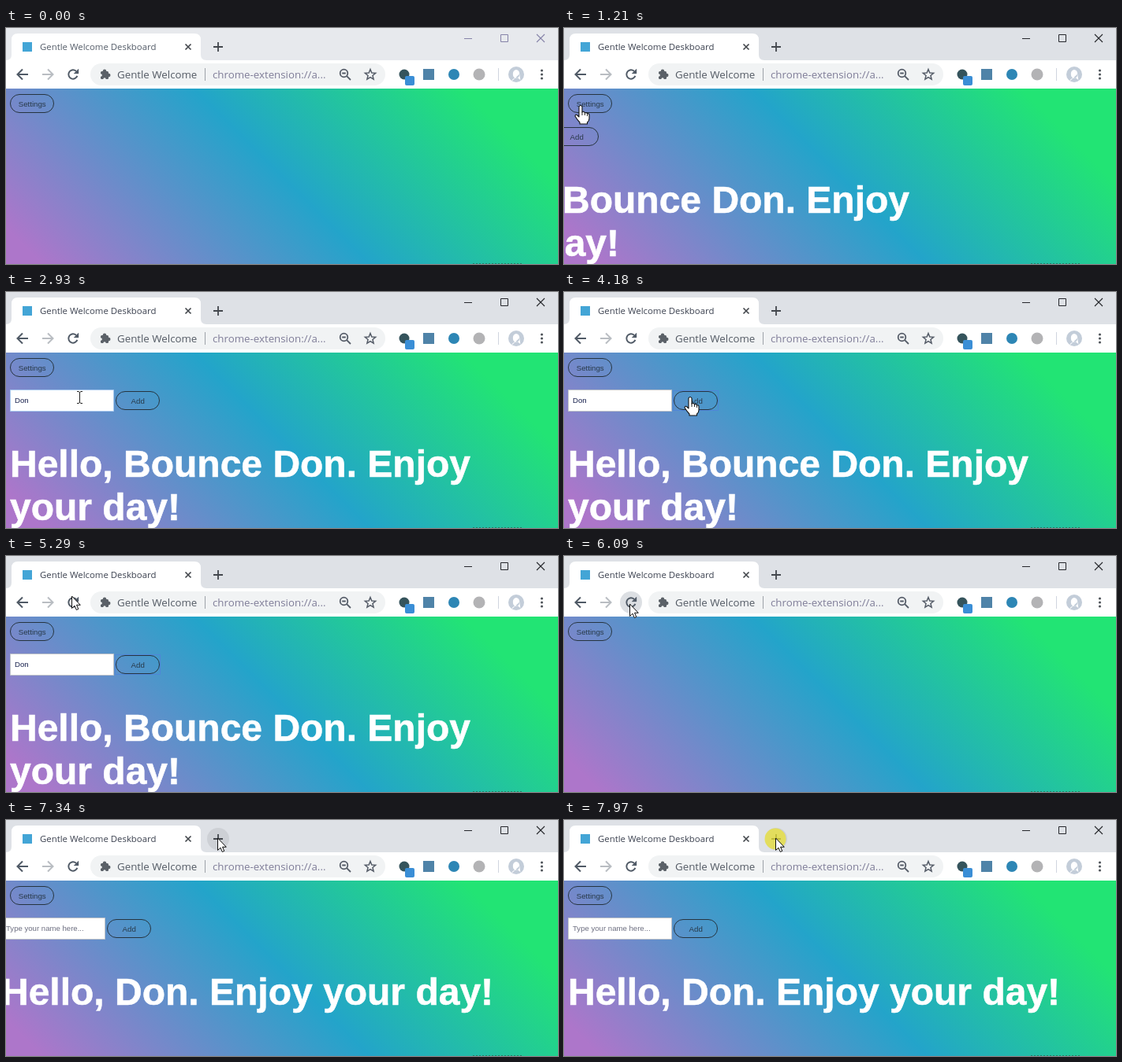
An HTML page with a canvas for the animation above (8 s loop, 700 by 300 pixels).

```html
<!DOCTYPE html>
<html lang="en">
<head>
<meta charset="utf-8">
<title>Greeting page</title>
<style>
html, body { margin: 0; width: 700px; height: 300px; overflow: hidden; }
canvas { display: block; }
</style>
</head>
<body>
<canvas id="stage" width="700" height="300"></canvas>
<script>
const LOOP = 8000;
const RELOAD = 5930;
const UI = '"Open Sans", "Noto Sans", sans-serif';
const ARIAL = '"Liberation Sans", Arial, sans-serif';
const ctx = document.getElementById('stage').getContext('2d');

// Pointer path: time, x, y
const path = [
  [300, 620, 302], [1200, 21, 99], [1720, 21, 99], [1960, 93, 134],
  [3250, 93, 134], [3560, 134, 178], [3860, 160, 134], [4500, 160, 134],
  [4820, 140, 74], [5130, 50, 52], [5430, 110, 51], [5610, 83, 61],
  [6500, 83, 61], [6920, 222, 52], [7040, 250, 39], [7350, 268, 23], [8000, 268, 23]
];
// Click highlights: start, end
const clicks = [[1360, 1660], [2000, 2320], [3870, 4170], [5930, 6080], [7800, 8000]];

const within = (t, a, b) => t >= a && t < b;
const inBox = (p, x, y, w, h) => p && p.x >= x && p.x < x + w && p.y >= y && p.y < y + h;

function ease(u) {
  if (u <= 0) return 0;
  if (u >= 1) return 1;
  const bez = (s, a, b) => 3 * (1 - s) ** 2 * s * a + 3 * (1 - s) * s * s * b + s ** 3;
  let lo = 0, hi = 1;
  for (let i = 0; i < 24; i++) {
    const mid = (lo + hi) / 2;
    if (bez(mid, 0.25, 0.25) < u) lo = mid; else hi = mid;
  }
  return bez(lo, 0.1, 1);
}

function pointerAt(t) {
  if (t < path[0][0]) return null;
  const i = path.findIndex(k => k[0] > t);
  const [t0, x0, y0] = path[i - 1], [t1, x1, y1] = path[i];
  const u = (t - t0) / (t1 - t0), s = u * u * (3 - 2 * u);
  return { x: x0 + (x1 - x0) * s, y: y0 + (y1 - y0) * s };
}

function text(str, x, y, font, color, align = 'left') {
  ctx.font = font;
  ctx.fillStyle = color;
  ctx.textAlign = align;
  ctx.fillText(str, x, y);
}

function rect(x, y, w, h, color) {
  ctx.fillStyle = color;
  ctx.fillRect(x, y, w, h);
}

function pill(x, y, w, h, r, fill, stroke) {
  ctx.beginPath();
  ctx.roundRect(x, y, w, h, r);
  if (fill) { ctx.fillStyle = fill; ctx.fill(); }
  if (stroke) { ctx.strokeStyle = stroke; ctx.lineWidth = 1; ctx.stroke(); }
}

function disc(x, y, r, color) {
  ctx.beginPath();
  ctx.arc(x, y, r, 0, Math.PI * 2);
  ctx.fillStyle = color;
  ctx.fill();
}

function ring(x, y, r, color, width) {
  ctx.beginPath();
  ctx.arc(x, y, r, 0, Math.PI * 2);
  ctx.strokeStyle = color;
  ctx.lineWidth = width;
  ctx.stroke();
}

// Strokes an SVG path string placed at x, y
function stroke(d, x, y, color, width, fill) {
  const shape = new Path2D(d);
  ctx.save();
  ctx.translate(x, y);
  if (fill) { ctx.fillStyle = fill; ctx.fill(shape); }
  ctx.strokeStyle = color;
  ctx.lineWidth = width;
  ctx.stroke(shape);
  ctx.restore();
}

// Outlined button with an optional square focus ring
function button(label, x, y, h, focused) {
  if (focused) pill(x - 0.5, y - 0.5, 57, h + 2, 0, null, '#4f86d8');
  pill(x + 0.5, y + 0.5, 55, h, h / 2, null, '#26343f');
  text(label, x + 28.2, y + h / 2 + 4, '9.7px ' + ARIAL, '#283a49', 'center');
}

function drawTabs(t) {
  const active = t >= 270;
  rect(0, 0, 700, 41, active ? '#dee1e6' : '#e7e9ed');
  ctx.beginPath();
  ctx.moveTo(0, 41);
  ctx.quadraticCurveTo(7, 41, 7, 34);
  ctx.lineTo(7, 15);
  ctx.quadraticCurveTo(7, 7, 15, 7);
  ctx.lineTo(239, 7);
  ctx.quadraticCurveTo(247, 7, 247, 15);
  ctx.lineTo(247, 34);
  ctx.quadraticCurveTo(247, 41, 254, 41);
  ctx.fillStyle = '#fff';
  ctx.fill();
  rect(21, 18, 12, 12, '#43a5d6');
  text('Gentle Welcome Deskboard', 43, 28, '11.4px ' + UI, active ? '#3c4250' : '#555d69');
  stroke('M-3.5 -3.5L3.5 3.5M3.5 -3.5L-3.5 3.5', 231, 24, '#45494e', 1.7);

  if (t > 7250) disc(269, 24, 14, '#cdd0d5');
  stroke('M-6 0H6M0 -6V6', 269, 24, '#43474d', 1.8);

  const ink = active ? '#25262b' : '#8582a8';
  stroke('M0 .5H10', 581, 13, ink, 1);
  stroke('M.5 .5H9.5V9.5H.5Z', 627, 8, ink, 1);
  stroke('M0 0L10 10M10 0L0 10', 673, 8, ink, 1.1);
}

function drawToolbar(t, lag) {
  rect(0, 41, 700, 36, '#fff');

  stroke('M7 0H-6M0 -6.5L-6.5 0L0 6.5', 21, 59, '#505a66', 2);
  stroke('M-7 0H6M0 -6.5L6.5 0L0 6.5', 53, 59, '#b9bdc2', 2);
  if (inBox(lag, 71, 45, 28, 28)) disc(85, 59, 14, '#dcdfe3');
  ctx.beginPath();
  ctx.arc(85, 59, 5.7, 0.35, 5.5);
  ctx.strokeStyle = '#505a66';
  ctx.lineWidth = 2;
  ctx.stroke();
  stroke('M0 0V-6L-6 0Z', 92, 58, '#505a66', 0.3, '#505a66');

  pill(107, 45, 374, 28, 14, '#f1f3f4');
  if (inBox(lag, 107, 45, 146, 28)) pill(108, 46, 145, 26, 13, '#dcdfe1');
  pill(120, 55, 10, 10, 1.5, '#5b6168');
  disc(125, 54.6, 2.2, '#5b6168');
  disc(130.3, 60, 2.2, '#5b6168');
  disc(120.2, 60, 1.7, '#f1f3f4');
  disc(125, 65, 1.7, '#f1f3f4');
  text('Gentle Welcome', 141, 64, '13.3px ' + UI, '#535a64');
  rect(252, 51, 1, 16, '#9da3a9');
  text('chrome-extension://a...', 262, 64, '13.3px ' + UI, '#7f7d98');

  ring(428.5, 57.5, 4.8, '#555c68', 1.8);
  stroke('M3.6 3.6L8.5 8.5M-2.3 0H2.3', 428.5, 57.5, '#555c68', 1.8);

  ctx.beginPath();
  for (let i = 0; i < 10; i++) {
    const a = -Math.PI / 2 + i * Math.PI / 5, r = i % 2 ? 3.1 : 7;
    ctx.lineTo(462 + r * Math.cos(a), 59.5 + r * Math.sin(a));
  }
  ctx.closePath();
  ctx.strokeStyle = '#555c68';
  ctx.lineWidth = 1.5;
  ctx.stroke();

  disc(505, 59, 6.5, '#35545c');
  pill(506, 61, 12, 12, 2, '#3a8ed6');
  rect(529, 52, 14, 14, '#4f83a8');
  disc(568, 59, 7, '#2d86b5');
  disc(600, 59, 7.5, '#b3b3b5');
  rect(624, 51, 1, 16, '#d0d5df');

  disc(647, 59, 10, '#c3cdd9');
  ctx.beginPath();
  ctx.ellipse(647, 58.5, 4.2, 5.5, 0, 0, Math.PI * 2);
  ctx.ellipse(647, 67.5, 5.5, 4, 0, Math.PI, 0);
  ctx.fillStyle = '#fff';
  ctx.fill();
  for (const y of [54, 59, 64]) disc(679.5, y, 1.6, '#50555b');
}

function drawPage(t) {
  // 45 degree gradient through the centre of the page
  const cx = 350, cy = 189, d = 230.5;
  const g = ctx.createLinearGradient(cx - d, cy + d, cx + d, cy - d);
  g.addColorStop(0.05, '#ad76ca');
  g.addColorStop(0.5, '#23a4ca');
  g.addColorStop(0.87, '#22e474');
  rect(0, 77, 700, 223, g);

  button('Settings', 5, 84, 23, within(t, 1360, 2010));

  const reloaded = t >= RELOAD;
  const slide = ease((t - (reloaded ? 6503 : 728)) / 1000);
  if (slide > 0) drawPanel(t, reloaded, Math.round(-700 * (1 - slide)));

  for (let x = 592; x < 655; x += 4) rect(x, 299, 2, 1, '#2b7a66');
}

function drawPanel(t, reloaded, dx) {
  ctx.save();
  ctx.translate(dx, 0);
  const focused = within(t, 2010, 3880);
  pill(5.5, 124.5, 131, 27, 0, '#fff', focused ? '#a9c9ee' : '#bfc3c9');

  const typed = reloaded ? '' : 'Don'.slice(0, [2180, 2250, 2320].filter(k => t >= k).length);
  const font = '9.6px ' + ARIAL;
  if (typed) text(typed, 11, 141, font, '#1b2450');
  else text('Type your name here...', 11, 141, font, '#6d6f80');
  if (focused && !within(t, 2930, 3400)) {
    ctx.font = font;
    rect(Math.round(11 + ctx.measureText(typed).width), 132, 1, 11, '#111');
  }

  button('Add', 139, 126, 23, within(t, 3880, RELOAD));

  const lines = reloaded
    ? ['Hello, Don. Enjoy your day!']
    : ['Hello, Bounce Don. Enjoy', 'your day!'];
  ctx.strokeStyle = '#fff';
  ctx.lineWidth = 0.6;
  lines.forEach((line, i) => {
    const y = 235 + 55 * i;
    text(line, 5, y, 'bold 48px ' + ARIAL, '#fff');
    ctx.strokeText(line, 5, y);
  });
  ctx.restore();
}

function drawPointer(t, p) {
  if (!p) return;
  if (clicks.some(([a, b]) => within(t, a, b))) disc(p.x, p.y + 1, 13.5, 'rgba(233,225,52,.75)');
  const x = Math.round(p.x), y = Math.round(p.y);
  const shown = within(t, 728, RELOAD);
  ctx.lineJoin = 'round';
  if (inBox(p, 5, 84, 56, 24) || shown && inBox(p, 139, 126, 56, 24)) {
    stroke('M-2 1Q0 -2 2 1V8Q4 6 5.5 9Q7.5 7.5 8.5 10Q11 9 11 12V16Q11 19 8.5 21V23H-1V21' +
      'Q-4 18 -7 13Q-6.5 10 -4 12L-2 14Z', x, y, '#111', 1.1, '#fff');
    stroke('M2 8V12M5.5 9V12M8.5 10V13', x, y, '#111', 0.9);
  } else if (shown && inBox(p, 5, 124, 132, 28)) {
    stroke('M-3 -7.5H-1L.5 -6.5L2 -7.5H4M.5 -6.5V6.5M-3 7.5H-1L.5 6.5L2 7.5H4', x, y, '#222', 1);
  } else {
    stroke('M.5 0V15.5L4 12.2L6.3 17.5L8.8 16.4L6.5 11.3H11.3Z', x, y, '#111', 1, '#fff');
  }
  ctx.lineJoin = 'miter';
}

function draw(t) {
  drawPage(t);
  drawTabs(t);
  drawToolbar(t, pointerAt(Math.max(0, t - 120)));
  drawPointer(t, pointerAt(t));
}

const start = performance.now();
function frame(now) {
  draw(Math.max(0, now - start) % LOOP);
  requestAnimationFrame(frame);
}
draw(0);
requestAnimationFrame(frame);
</script>
</body>
</html>
```
